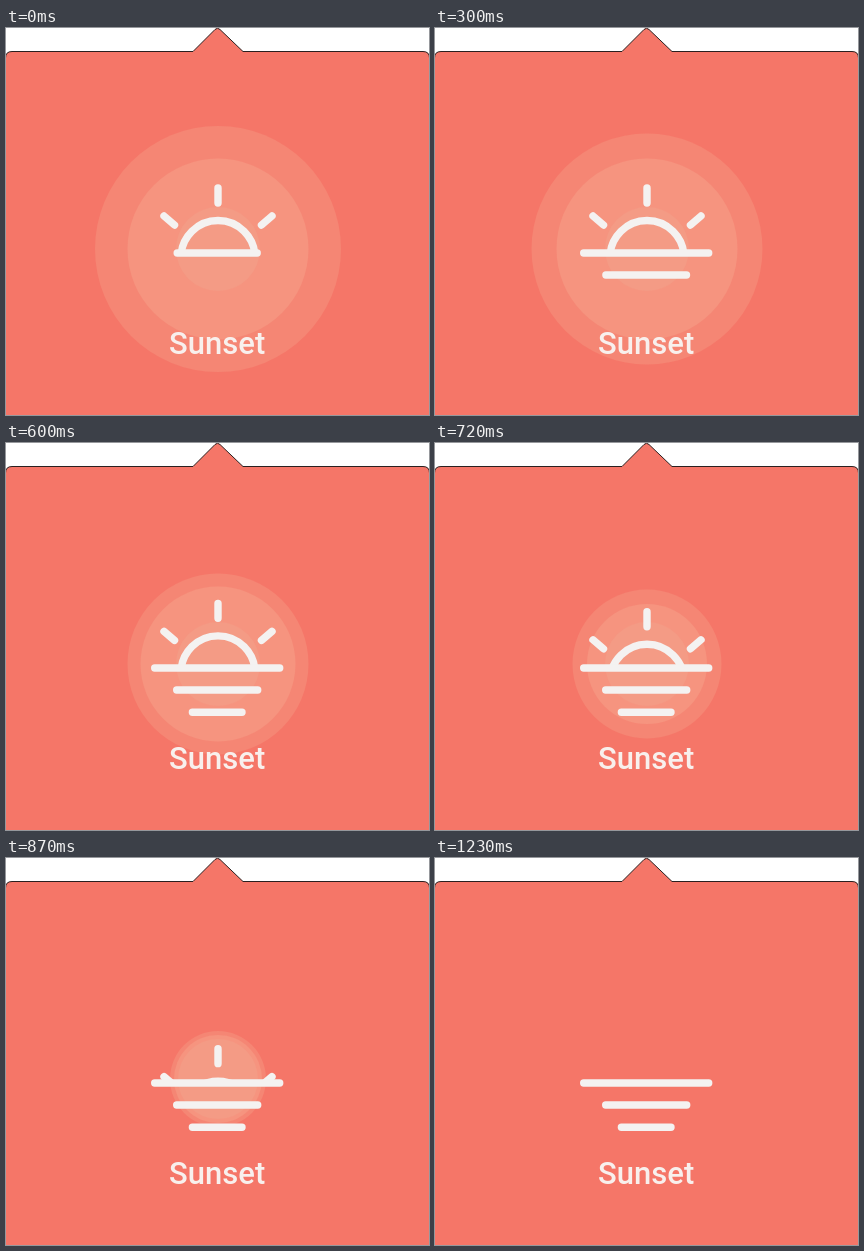
These frames come from a looping animation (423x387 px, 1.44 s). An HTML page:

```html
<!DOCTYPE html>
<html lang="en">
<head>
<meta charset="utf-8">
<title>Sunset</title>
<style>
  html, body { margin: 0; width: 100%; height: 100%; overflow: hidden; background: #fff; }
  svg { display: block; }
  .ink { fill: none; stroke: #f4f2f1; stroke-width: 7.4; stroke-linecap: round; }
  text { font: 500 31px Roboto, sans-serif; fill: #f8f0ed; text-anchor: middle; }
</style>
</head>
<body>
<svg width="423" height="387" viewBox="0 0 423 387">
  <clipPath id="sky"><rect width="423" height="225"/></clipPath>
  <path fill="#f57668" stroke="#2a2020" d="M-.5 388V30Q-.5 23.5 6 23.5H187L209 1.5Q211.500 -1 214 1.500L237 23.500H417Q423.500 23.500 423.500 30V388Z"/>
  <circle id="outer" cx="212" cy="221" fill="#f58674"/>
  <circle id="middle" cx="212" cy="221" fill="#f6947f"/>
  <circle id="inner" cx="212" cy="221" fill="#f49b85"/>
  <g clip-path="url(#sky)">
    <path id="sun" class="ink" d="M175 229.500A37 37 0 0 1 249 229.500M212 160V175M158 188L168.500 197M266 188L255.500 197"/>
  </g>
  <path id="lines" class="ink"/>
  <text x="211.200" y="326">Sunset</text>
</svg>
<script>
const LOOP = 1440, STEP = 30, LAST = 1230;
const byId = id => document.getElementById(id);

// Radius over time: [ms, px] points joined by a smooth curve.
const halos = {
  outer: [[180, 123], [450, 99.5], [600, 90.5], [720, 74.5], [870, 48], [1080, 7], [1200, 0]],
  middle: [[440, 90.5], [600, 77.5], [720, 60], [870, 44], [1080, 6.5], [1200, 0]],
  inner: [[750, 42], [870, 40], [1080, 6], [1200, 0]]
};

// Horizon and its reflections.
const bars = [
  { y: 225, from: 40, to: 62.5, start: 0, end: 225 },
  { y: 247, from: 0, to: 40.5, start: 90, end: 310 },
  { y: 269.3, from: 0, to: 24.8, start: 305, end: 525 }
];

function ease(t, start, end) {
  const p = Math.min(1, Math.max(0, (t - start) / (end - start)));
  return (1 - Math.cos(Math.PI * p)) / 2;
}

function curve(t, points) {
  const last = points.length - 1;
  if (t <= points[0][0]) return points[0][1];
  if (t >= points[last][0]) return points[last][1];
  const i = points.findIndex(p => p[0] > t) - 1;
  const slope = k => k === 0 || k === last ? 0 :
    (points[k + 1][1] - points[k - 1][1]) / (points[k + 1][0] - points[k - 1][0]);
  const [t0, a] = points[i], [t1, b] = points[i + 1];
  const span = t1 - t0, p = (t - t0) / span, q = 1 - p;
  return a * q * q * (1 + 2 * p) + b * p * p * (3 - 2 * p)
    + span * p * q * (q * slope(i) - p * slope(i + 1));
}

function draw(now) {
  const t = Math.min(LAST, Math.floor(now % LOOP / STEP) * STEP);
  for (const id in halos) byId(id).setAttribute("r", Math.max(0, curve(t, halos[id])));
  byId("sun").setAttribute("transform", `translate(0 ${68 * ease(t, 570, 1210)})`);
  byId("lines").setAttribute("d", bars.map(({ y, from, to, start, end }) => {
    const half = from + (to - from) * ease(t, start, end);
    return t < start ? "" : `M${211.2 - half} ${y}h${2 * half}`;
  }).join(""));
}

const began = performance.now();
function frame() {
  draw(performance.now() - began);
  requestAnimationFrame(frame);
}
frame();
</script>
</body>
</html>
```
